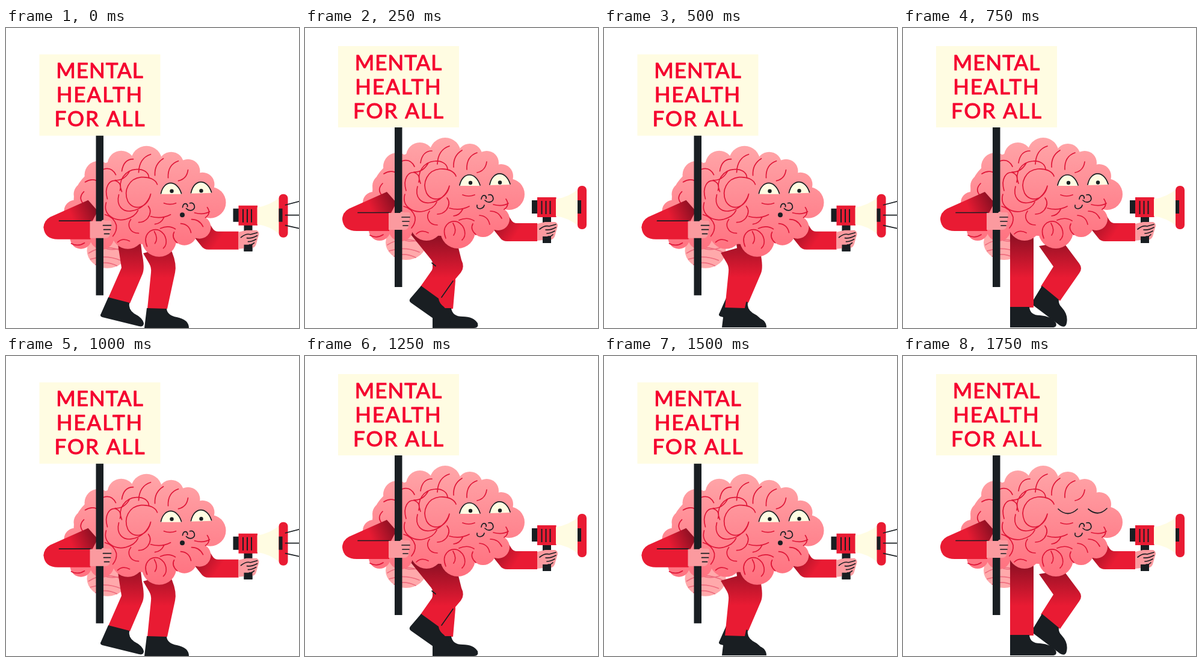
Animation, 487 px wide and 498 px high, one loop 2 s. Source, as an HTML page:

```html
<!DOCTYPE html>
<html lang="en">
<head>
<meta charset="utf-8">
<title>Mental health for all</title>
<style>
html, body { margin: 0; width: 100%; height: 100%; overflow: hidden; background: #fff; }
svg { display: block; width: 487px; height: 498px; }
.line { fill: none; stroke: #191e22; stroke-width: 1.7; stroke-linecap: round; stroke-linejoin: round; }
.fold { fill: none; stroke: #df1738; stroke-width: 1.7; stroke-linecap: round; }
.red { fill: #e91b33; }
.ink { fill: #191e22; }
.cream { fill: #fffce2; }
.skin { fill: #fb9a9f; }
.leg { fill: url(#trouser); }
text { font: 35px Lato, "Open Sans", sans-serif; letter-spacing: 2px; text-anchor: middle;
  fill: #f5032f; stroke: #f5032f; stroke-width: 1.1; stroke-linejoin: round; }
</style>
</head>
<body>
<svg viewBox="0 0 487 498">
  <defs>
    <linearGradient id="flesh" gradientUnits="userSpaceOnUse" x1="0" y1="185" x2="0" y2="365">
      <stop stop-color="#ffa5a8"/><stop offset="1" stop-color="#ff6f7e"/>
    </linearGradient>
    <linearGradient id="trouser" gradientUnits="userSpaceOnUse" x1="0" y1="345" x2="0" y2="415">
      <stop stop-color="#8f1024"/><stop offset="1" stop-color="#e91b33"/>
    </linearGradient>
    <linearGradient id="sleeveL" gradientUnits="userSpaceOnUse" x1="146" y1="282" x2="108" y2="298">
      <stop stop-color="#8a0f22"/><stop offset="1" stop-color="#e91b33"/>
    </linearGradient>
    <linearGradient id="sleeveR" gradientUnits="userSpaceOnUse" x1="315" y1="320" x2="350" y2="344">
      <stop stop-color="#9c1126"/><stop offset="1" stop-color="#e91b33"/>
    </linearGradient>
    <g id="front">
      <path class="leg" d="M228 374L238 391Q242 398 241 406L235 466H268L281 406Q284 392 276 372L270 362Z"/>
      <path class="ink" d="M234 465L267 466Q268 477 284 480 304 484 304 498H230Z"/>
    </g>
    <g id="back">
      <path class="leg" d="M183 340L192 398 170 448 206 457 227 408Q231 398 226 374L222 340Z"/>
      <path class="ink" d="M170 447L205 456Q203 467 213 474 227 481 229 490 229 497 221 495L160 480Q155 478 158 474Z"/>
    </g>
  </defs>

  <g class="body">
    <ellipse cx="168" cy="356" rx="34" ry="29" fill="#ffa9ab"/>
    <path class="fold" style="stroke:#ee6c7e" d="M137 360Q165 342 200 360M140 370Q165 362 190 372M148 379Q165 372 184 381M160 350Q175 358 195 350"/>
  </g>

  <g class="pose"><use href="#back"/><use href="#front"/></g>
  <g class="pose">
    <path class="leg" d="M212 350H250V420L246 466H212Z"/>
    <path class="ink" d="M212 465H243Q245 479 262 479 280 479 287 490 289 498 281 498H212Z"/>
    <path class="leg" d="M172 338L210 385Q215 392 211 402L192 429 221 451 259 406Q266 397 260 385L250 345Z"/>
    <path class="line" d="M246 420L227 447M211 390L217 395"/>
    <path class="ink" d="M193 428L222 449Q223 457 231 463 243 475 241 490 240 499 230 494L176 456Q172 453 175 449Z"/>
  </g>
  <g class="pose"><use href="#back" x="34" y="-1"/><use href="#front" x="-34" y="-1"/></g>
  <g class="pose">
    <path class="leg" d="M226 362L250 396 229 429 261 453 293 407Q299 399 293 391L266 355Z"/>
    <path class="ink" d="M231 428L259 451Q258 458 264 464 275 476 272 490 270 499 261 494L216 460Q212 456 217 451Z"/>
    <path class="leg" d="M178 335H217V464H178Z"/>
    <path class="ink" d="M178 463H210Q211 477 228 477 246 478 254 489 257 497 248 497H178Z"/>
  </g>

  <g class="body">
    <path fill="url(#sleeveR)" d="M300 318L324 348Q328 354 336 354H386V324H352Q346 324 343 319L336 308Z"/>
    <g id="lobes" fill="url(#flesh)"><ellipse cx="226" cy="272" rx="114" ry="73"/></g>
    <path class="fold" d="
      M240 196Q221 202 220 226M211 204Q195 204 192 224
      M261 203Q246 212 247 231M286 207Q268 213 269 235M302 222Q300 237 286 240
      M161 221Q175 216 182 230M181 239Q196 240 205 224M131 242Q144 234 156 243M128 278Q119 268 129 258
      M240 262C236 284 212 292 202 274 194 256 204 236 224 234 238 233 248 238 251 246
      M192 258C184 240 198 222 216 221 228 220 236 226 237 234
      M168 270C162 250 172 238 182 240 190 243 191 250 189 256
      M187 263C182 282 194 292 208 290 224 288 236 276 240 262
      M166 276C160 296 180 308 198 304Q214 300 219 289
      M164 296Q179 300 183 314 184 324 177 332
      M236 282Q243 291 235 302 229 309 220 309
      M240 299Q258 304 273 296M262 301Q257 311 247 312
      M207 304C200 313 205 327 220 327
      M234 349C226 330 240 317 254 322 267 329 269 345 261 352
      M246 324Q253 336 247 344M256 319Q270 313 281 320
      M284 343Q274 334 279 325M290 311Q304 312 307 326
      M308 304Q321 304 327 316M331 301Q341 294 334 284
      M313 293Q328 297 338 291M262 277Q272 281 282 277
      M185 342Q193 334 205 340M108 344Q119 350 130 343"/>
    <g class="eyes">
      <path class="cream" d="M257 262C262 238 284 238 291 262ZM307 261C312 236 334 236 341 260Z"/>
      <path class="line" d="M257 261C262 238 284 238 291 261M307 260C312 236 334 236 341 259"/>
      <circle class="ink" cx="275" cy="257" r="3.2"/><circle class="ink" cx="324" cy="256.500" r="3.2"/>
    </g>
    <path class="line lids" d="M258 254Q274 269 290 254M308 254Q324 268 339 253"/>
    <path class="line" d="M293 284Q294 277 299 278 302 280 301 283M305 277C313 275 315 285 310 288Q304 291 299 286"/>
    <path class="line smile" d="M286 294Q285 300 291 300 297 299 298 294"/>
    <circle class="ink shout" cx="292.500" cy="296.500" r="4"/>

    <path class="red" d="M78 306H140V337H86Q64 337 62 318 62 306 78 306Z"/>
    <path fill="url(#sleeveL)" d="M136 272L73 300Q62 306 62 318L88 307H143L152 290Z"/>
    <path class="line" d="M88 306.500H140"/>
    <path class="ink" d="M149 160H161.500V430H149Z"/>
    <path class="cream" d="M55 30H256V165H55Z"/>
    <text x="155.500" y="69.500" letter-spacing="1" style="letter-spacing:1px">MENTAL</text>
    <text x="155.500" y="109.500">HEALTH</text>
    <text x="156" y="149.500" word-spacing="1">FOR ALL</text>
    <path class="skin" d="M139 307H158Q160 303 164 306H173Q176 309 174 313L172 330Q171 335 164 335H139Z"/>
    <path class="line" d="M161 314H174M162 321H173M163 328H171"/>

    <path class="ink" d="M377 286H387V308H377ZM395 310H409V357H395Z"/>
    <path class="red" d="M386 281H417.500V314H386Z"/>
    <path class="line" style="stroke-width:2;stroke-linecap:butt" d="M393.500 287V309M400.500 287V309M407.500 287V309"/>
    <path class="cream" d="M417 284Q438 281 455 267V329Q438 315 417 312Z"/>
    <rect class="red" x="453" y="262" width="15" height="72" rx="7"/>
    <path class="ink" d="M453 286H459V308H453Z"/>
    <path class="skin" d="M386 325L399 322H416Q422 325 419 332L415 346Q412 353 405 351L386 353Z"/>
    <path class="ink" d="M395 346H409V357H395Z"/>
    <path class="line" d="M390 334Q398 327 406 329L417 326M400 335Q408 336 417 331M402 341Q408 341 415 337M404 346Q408 347 412 343"/>
    <path class="line shout" d="M464 280L487 274M464 297H487M464 314L487 319"/>
  </g>
</svg>
<script>
const all = sel => [...document.querySelectorAll(sel)];
const show = (sel, on) => all(sel).forEach(el => el.style.display = on ? "" : "none");

// Rounded bumps around the brain: x, y, radius
const bumps = [
  [191, 213, 23], [233, 208, 26], [274, 213, 21], [302, 224, 20], [326, 246, 20],
  [339, 276, 26], [321, 317, 19], [296, 326, 21], [254, 337, 29],
  [202, 326, 27], [159, 334, 20], [124, 335, 18], [112, 318, 16], [114, 290, 18],
  [131, 262, 19], [153, 230, 23]
];
const lobes = document.getElementById("lobes");
for (const [cx, cy, r] of bumps) {
  const bump = document.createElementNS("http://www.w3.org/2000/svg", "circle");
  Object.entries({ cx, cy, r }).forEach(pair => bump.setAttribute(...pair));
  lobes.append(bump);
}

function draw(now) {
  const step = Math.floor(now / 250) % 8;
  const low = step % 2 === 0;
  const blink = step === 7;
  all(".body").forEach(el => el.setAttribute("transform", low ? "translate(.5 13.700)" : ""));
  all(".pose").forEach((el, i) => el.style.display = i === step % 4 ? "" : "none");
  show(".shout", low);
  show(".smile", !low);
  show(".eyes", !blink);
  show(".lids", blink);
}

const start = performance.now();
function tick() {
  draw(performance.now() - start);
  requestAnimationFrame(tick);
}
tick();
</script>
</body>
</html>
```
